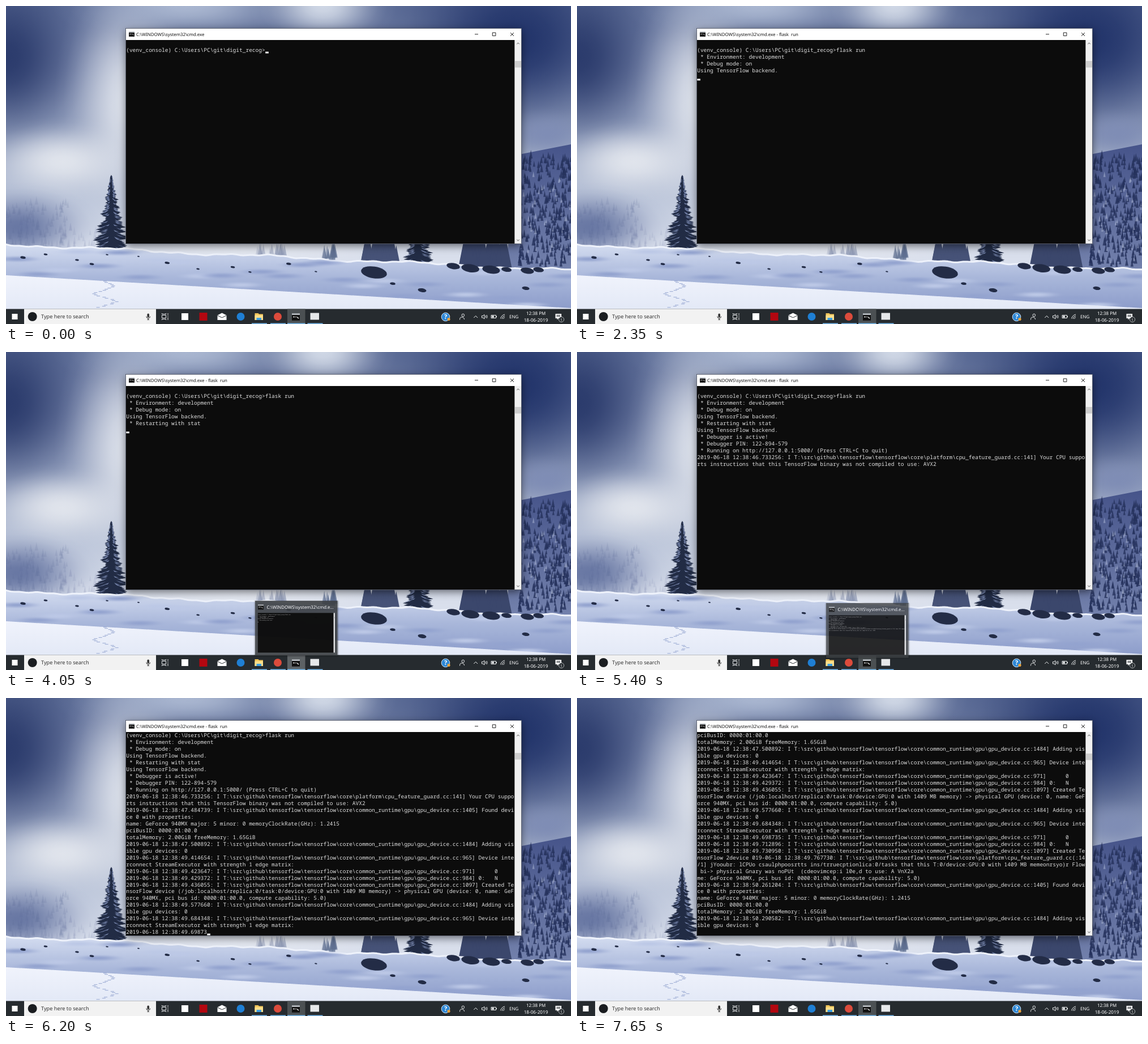
Recreate the animation shown at these times as an HTML page with a canvas. Size 998x561 px, loop 8 s.

```html
<!DOCTYPE html>
<html lang="en">
<head>
<meta charset="utf-8">
<title>Console session</title>
<style>
  html, body { margin: 0; width: 100%; height: 100%; overflow: hidden; background: #262b2f; }
  canvas, svg { position: absolute; left: 0; top: 0; width: 998px; height: 561px; display: block; }
  text { white-space: pre; text-rendering: geometricPrecision; font-family: "Noto Sans", "Open Sans", sans-serif; }
  .mono text { font: 9.533px "Noto Sans Mono", "DejaVu Sans Mono", monospace; fill: #dedede; }
  .line { fill: none; stroke-width: 1; }
</style>
</head>
<body>
<canvas id="wall" width="998" height="561"></canvas>
<svg viewBox="0 0 998 561" xmlns="http://www.w3.org/2000/svg">
  <!-- window -->
  <rect x="211.5" y="39.5" width="699" height="380" fill="#fff" stroke="#4a5060" stroke-width=".8"/>
  <g id="cmdIcon">
    <rect x="217" y="45" width="10" height="9" fill="#111"/>
    <rect x="217" y="45" width="10" height="2" fill="#b9bdc2"/>
    <path class="line" d="M218.5 49.5h2m1 0h1m1 0l2 2" stroke="#eee"/>
  </g>
  <text id="title" x="230" y="52.8" font-size="7.82" fill="#111"></text>
  <path class="line" d="M828 49.8h6M859.3 47h5.6v5.6h-5.6zM891 47l6 6m0-6l-6 6" stroke="#222"/>
  <g id="screen">
    <rect x="212" y="60" width="686.6" height="359" fill="#0c0c0c"/>
    <rect x="898.6" y="60" width="11.4" height="359" fill="#f0f0f0"/>
    <rect id="thumb" x="899" width="11" height="11.5" fill="#cdcdcd"/>
    <path class="line" d="M902.3 67.2l2.2-2.2 2.2 2.2M902.3 412l2.2 2.2 2.2-2.2" stroke="#444"/>
    <g id="rows" class="mono"></g>
    <rect id="cursor" width="5.7" height="3" fill="#f2f2f2"/>
  </g>

  <!-- taskbar, left part -->
  <rect y="534.5" width="998" height="27" fill="#262b2f"/>
  <rect x="32" y="534.5" width="233" height="27" fill="#f2f2f2"/>
  <rect x="10.5" y="543" width="10" height="10" fill="#fff"/>
  <circle cx="46.7" cy="548" r="8" fill="#1a1d20"/>
  <text x="62" y="551.4" font-size="9.2" fill="#333">Type here to search</text>
  <rect x="249.4" y="542.5" width="3.6" height="7" rx="1.8" fill="#333"/>
  <path class="line" d="M247.8 547.5a3.4 3.4 0 0 0 6.8 0M251.2 551v2.4m-1.8 0h3.6" stroke="#333"/>
  <path class="line" d="M275.5 545.5h7v5h-7zM275.5 542v1.5h7V542M275.5 554v-1.5h7v1.5M286 542v3m0 4v5m-1-7h2" stroke="#e4e6e8"/>
  <rect x="310" y="542" width="12" height="12" fill="#fff"/>
  <rect x="341.5" y="541" width="14" height="14" fill="#b20710"/>
  <path d="M373.5 545.5l8-4 8 4v8.5h-16z" fill="#fff"/>
  <path class="line" d="M373.5 545.8l8 4 8-4" stroke="#262b2f"/>
  <circle cx="414.5" cy="548" r="7" fill="#1f7fd4"/>
  <path d="M439.5 542h6l1.5 1.5h7V554h-14.5z" fill="#f2c65a"/>
  <rect x="439.5" y="545.5" width="14.5" height="8.5" fill="#ffe08c"/>
  <rect x="442.5" y="550" width="8.5" height="4" fill="#3f9fe0"/>
  <circle cx="480" cy="548" r="7" fill="#dc4b3c"/>
  <rect x="497" y="534.5" width="31.5" height="27" fill="#4b5053"/>
  <rect id="hover" x="497" y="534.5" width="31.5" height="27" fill="#fff"/>
  <use href="#cmdIcon" transform="translate(201.2 479.2) scale(1.4)"/>
  <rect x="537.5" y="541.5" width="15.5" height="12" fill="#e6e8ea"/>
  <path d="M434 560.2h27m6 0h27m3 0h31.5m4 0h27" stroke="#76b9ed" stroke-width="1.6"/>

  <!-- taskbar, right part -->
  <circle cx="776.5" cy="548.5" r="7.3" fill="#2d87d6" stroke="#dceaf6"/>
  <text x="776.5" y="552.4" font-size="11" font-weight="700" fill="#fff" text-anchor="middle">?</text>
  <circle cx="782" cy="552.5" r="2.6" fill="#e9a13b"/>
  <g class="line" stroke="#eceeef">
    <circle cx="807.3" cy="545.5" r="2.3"/>
    <path d="M801.5 553.5c0-3 1-4.500 3-4.500m0 0c3 0 5 1 5 4M826.300 550l3.400-3.400 3.400 3.400"/>
    <path d="M840.500 546.500h2l2.500-2v7.500l-2.500-2h-2zM847 546q1 2 0 4M849 545q2 3 0 6"/>
    <path d="M857 545.500h8.500v5H857zM866.500 547v2"/>
    <path d="M873.500 551.500q1.500-6 7.500-7.500M876 552q1-4.500 5-5.500M878.500 552q.5-2 2.500-3"/>
  </g>
  <rect x="858" y="546.5" width="4" height="3" fill="#eceeef"/>
  <g fill="#fff">
    <text x="889" y="551" font-size="7.9">ENG</text>
    <text x="936" y="544.8" font-size="7.9" text-anchor="middle">12:38 PM</text>
    <text x="936" y="557" font-size="8.2" text-anchor="middle">18-06-2019</text>
    <path d="M970.5 543H981v8h-5l-2.500 2.500V551h-3z"/>
  </g>
  <path class="line" d="M972.5 545.5h6.500m-6.500 2h6.500" stroke="#262b2f"/>
  <circle cx="981" cy="553" r="4.6" fill="#262b2f" stroke="#cfd2d4" stroke-width=".8"/>
  <text x="981" y="555.5" font-size="6.6" fill="#fff" text-anchor="middle">1</text>

  <!-- taskbar preview -->
  <g id="preview">
    <rect x="438" y="437" width="150" height="100" rx="3" opacity=".14"/>
    <rect x="440" y="438" width="145.6" height="96.5" fill="#3d4144" opacity=".9"/>
    <use href="#cmdIcon" transform="translate(228 399.5)"/>
    <text x="460.5" y="451.8" font-size="7.8" fill="#fff">C:\WINDOWS\system32\cmd.e...</text>
    <use href="#screen" transform="translate(444.8 459.3) scale(.195) translate(-212 -60)"/>
  </g>
</svg>

<script>
const $ = id => document.getElementById(id);
const clamp = v => Math.min(1, Math.max(0, v));

// ---------- wallpaper ----------
const W = 998, H = 561;
const ctx = $('wall').getContext('2d');
let seed = 7;
const rnd = (a = 0, b = 1) => a + (b - a) * (seed = seed * 16807 % 2147483647) / 2147483647;
const crest = x => 419 + .046 * x + 2 * Math.sin(x / 42) + Math.sin(x / 13) + .6 * Math.sin(x / 5);
const shore = x => 475 + .058 * x;

function fade(y0, y1, ...colors) {
  const g = ctx.createLinearGradient(0, y0, 0, y1);
  colors.forEach((c, i) => g.addColorStop(i / (colors.length - 1), c));
  return g;
}
function glow(x, y, rx, ry, color) {
  ctx.save();
  ctx.translate(x, y);
  ctx.scale(rx, ry);
  const g = ctx.createRadialGradient(0, 0, 0, 0, 0, 1);
  for (let k = 0; k <= 1; k += .125) {
    const alpha = Math.round(255 * Math.cos(k * Math.PI / 2) ** 2);
    g.addColorStop(k, color + alpha.toString(16).padStart(2, '0'));
  }
  ctx.fillStyle = g;
  ctx.fillRect(-1, -1, 2, 2);
  ctx.restore();
}
function shape(points, fill) {
  ctx.beginPath();
  points.forEach(p => ctx.lineTo(...p));
  ctx.fillStyle = fill;
  ctx.fill();
}
function ground(edge, fill) {
  const points = [];
  for (let x = 0; x <= W; x += 2) points.push([x, edge(x)]);
  shape([...points, [W, H], [0, H]], fill);
}
function forest(x0, x1, y0, y1, height, count, fill) {
  for (let i = 0; i < count; i++) {
    const x = rnd(x0, x1), y = rnd(y0, y1), h = height * rnd(.6, 1.1);
    shape([[x - h * .2, y], [x, y - h], [x + h * .2, y]], fill);
  }
}
function conifer(x, top, base, half) {
  for (let y = top; y < base; y += 2) {
    for (const side of [-1, 1]) {
      const w = side * (2 + half * (y - top) / (base - top) * rnd(.3, 1)), tip = y + Math.abs(w) * .2;
      shape([[x, y - 3], [x + w, tip], [x + w * .5, tip + 2], [x, y + 2]], '#222c45');
      if (rnd() < .6) shape([[x + w * .3, y - 2], [x + w, tip - 1], [x + w * .5, y + 1]], '#7786ad');
    }
  }
}
function rock(x, y, r) {
  ctx.beginPath();
  ctx.ellipse(x, y, r, r * .45, .15, 0, 7);
  ctx.fillStyle = '#232c46';
  ctx.fill();
}

function paintWall() {
  ctx.fillStyle = fade(0, 440, '#5d6d97', '#7482a8', '#8f9cbb', '#b9c3d8', '#d9dfec');
  ctx.fillRect(0, 0, W, H);
  glow(0, 90, 170, 190, '#2b3b6c');
  glow(215, 170, 130, 260, '#dbe0ea');
  glow(100, 275, 160, 80, '#e0e4ec');
  glow(20, 390, 150, 80, '#6877a3');
  glow(320, 0, 240, 70, '#a9b6d0');
  glow(560, 0, 130, 80, '#cfd7e5');
  glow(900, 60, 260, 210, '#22346a');
  glow(955, 225, 90, 50, '#7f8db5');
  glow(430, 425, 330, 45, '#e4e8f1');
  forest(0, 110, 350, 430, 14, 110, '#5c6a9922');
  forest(90, 212, 395, 435, 16, 60, '#6c7aa51c');

  const ridge = fade(245, 470, '#46548a', '#7482ad');
  shape([[880, 480], [906, 262], [W, 244], [W, 480]], ridge);
  forest(906, W, 268, 462, 14, 330, '#26325ccc');
  forest(906, W, 300, 460, 10, 45, '#aab6d488');
  forest(444, 494, 440, 446, 24, 26, '#8794b244');
  forest(560, 582, 442, 448, 26, 16, '#60709288');
  forest(632, 690, 446, 460, 44, 60, '#465277');
  forest(806, 884, 460, 470, 56, 70, '#3b476c');
  conifer(186, 301, 431, 38);
  conifer(727, 360, 459, 38);

  ground(crest, '#eef2fb');
  ground(x => crest(x) + 3, fade(422, 535, '#d3dcf0', '#a9b7da', '#8c9cca'));
  for (let x = 20; x < W; x += 36) glow(x, rnd(crest(x) + 8, shore(x)), 50, 7, rnd() < .5 ? '#bcc8e6' : '#93a3cf');
  ground(shore, fade(474, 540, '#f0f3fc', '#e2e8f6'));

  for (let x = 30; x < 560; x += rnd(25, 70)) rock(x, crest(x) + rnd(12, 34), rnd(2, 5));
  for (let x = 790; x < 960; x += rnd(18, 38)) rock(x, crest(x) + 4, rnd(9, 16));
  for (const x of [683, 735, 918]) rock(x, rnd(482, 510), rnd(4, 9));
  rock(650, 470, 23);
  for (let y = 483; y < 533; y += 2) {
    ctx.fillStyle = '#a5b3d8';
    ctx.fillRect(168 + 17 * Math.sin(y * .22) + rnd(0, 8), y, 6, 1.2);
  }
  ctx.shadowColor = '#0008';
  ctx.shadowBlur = 14;
  ctx.shadowOffsetY = 4;
  ctx.fillStyle = '#222';
  ctx.fillRect(212, 40, 698, 379);
}

// ---------- console output ----------
const raw = String.raw;
const prompt = raw`(venv_console) C:\Users\PC\git\digit_recog>`;
const run = prompt + 'flask run';
const core = raw`T:\src\github\tensorflow\tensorflow\core`;
const guard = core + raw`\platform\cpu_feature_guard.cc`;
const backend = 'Using TensorFlow backend.';
const gpu = (sec, tail) => `2019-06-18 12:38:${sec}: I ${core}` + raw`\common_runtime\gpu\gpu_device.cc:` + tail;
const found = sec => [gpu(sec, '1405] Found devi'), 'ce 0 with properties:',
  'name: GeForce 940MX major: 5 minor: 0 memoryClockRate(GHz): 1.2415', 'pciBusID: 0000:01:00.0'];
const memory = 'totalMemory: 2.00GiB freeMemory: 1.65GiB';
const adding = sec => [gpu(sec, '1484] Adding vis'), 'ible gpu devices: 0'];
const matrix = sec => [gpu(sec, '965] Device inte'), 'rconnect StreamExecutor with strength 1 edge matrix:'];
const edges = (a, b) => [gpu(a, '971]      0'), gpu(b, '984] 0:   N')];
const created = sec => gpu(sec, '1097] Created Te');

// A burst starts at a time, prints a line every few ms and leaves an unfinished tail.
const bursts = [
  { at: 0, lines: [''], tail: prompt },
  { at: 1000, tail: run },
  { at: 1150, tail: prompt + 'set FLASK_ENV=development' },
  { at: 1500, tail: run },
  { at: 1600, lines: [run] },
  { at: 1800, lines: [' * Environment: development', ' * Debug mode: on'] },
  { at: 2350, lines: [backend] },
  { at: 3050, lines: [' * Restarting with stat'] },
  { at: 4200, lines: [backend] },
  { at: 4400, every: 25, lines: [' * Debugger is active!', ' * Debugger PIN: 122-894-579',
    ' * Running on http://127.0.0.1:5000/ (Press CTRL+C to quit)'] },
  { at: 4900, every: 100, lines: [`2019-06-18 12:38:46.733256: I ${guard}:141] Your CPU suppo`,
    'rts instructions that this TensorFlow binary was not compiled to use: AVX2'] },
  { at: 5450, every: 16, lines: [...found('47.484739'), memory, ...adding('47.500892')] },
  { at: 5950, every: 24, lines: [...matrix('49.414654'), ...edges('49.423647', '49.429372'), created('49.436055'),
    'nsorFlow device (/job:localhost/replica:0/task:0/device:GPU:0 with 1409 MB memory) -> physical GPU (device: 0, name: GeF',
    'orce 940MX, pci bus id: 0000:01:00.0, compute capability: 5.0)',
    ...adding('49.577660'), ...matrix('49.684348')], tail: '2019-06-18 12:38:49.69873' },
  { at: 6250, every: 8, lines: [...edges('49.698735', '49.712896'), created('49.730950'),
    `nsorFlow 2device 019-06-18 12:38:49.767730: I ${guard}(:14`,
    '/1] jYooubr: lCPUo csaulphpoosrtts ins/trruecptionlica:0/tasks that this T:0/device:GPU:0 with 1409 MB memeonrsyo)r Flow',
    ' bi-> physical Gnary was noPUt  (cdeovimcep:i l0e,d to use: A VnX2a',
    'me: GeForce 940MX, pci bus id: 0000:01:00.0, compute capability: 5.0)'] },
  { at: 6700, lines: found('50.261204'), tail: 't' },
  { at: 6750, lines: [memory, ...adding('50.290582')] },
];
const cursorFlips = [300, 800, 1300, 1500, 3200, 3700, 4200, 5550, 5700, 5950, 7650];

const LOOP = 8000, TICK = 50, ROWS = 30, LEFT = 212.2, TOP = 60, PITCH = 11.965, CHAR = 5.72;
const rows = Array.from({ length: ROWS }, (_, i) => {
  const row = document.createElementNS('http://www.w3.org/2000/svg', 'text');
  row.setAttribute('x', LEFT);
  row.setAttribute('y', TOP + PITCH * i + 9.3);
  return $('rows').appendChild(row);
});

function printed(t) {
  const out = [];
  let tail = '';
  for (const { at, every = 0, lines = [], tail: rest = '' } of bursts) {
    if (at > t) break;
    const ready = lines.filter((_, i) => at + i * every <= t);
    out.push(...ready);
    tail = ready.length === lines.length ? rest : '';
  }
  return [...out, tail];
}

function drawConsole(t) {
  const text = printed(t);
  const view = text.slice(-ROWS);
  rows.forEach((row, i) => row.textContent = view[i] ?? '');
  $('cursor').setAttribute('x', LEFT + CHAR * view.at(-1).length);
  $('cursor').setAttribute('y', TOP + PITCH * (view.length - 1) + 8.6);
  $('cursor').setAttribute('opacity', 1 - cursorFlips.filter(f => f <= t).length % 2);
  $('thumb').setAttribute('y', 97 + Math.floor(text.length / 42));
  $('title').textContent = raw`C:\WINDOWS\system32\cmd.exe` + (t < 1650 ? '' : ' - flask  run');
}

function drawPreview(t) {
  const enter = clamp((t - 3900) / 200), leave = clamp((t - 5300) / 200);
  const shift = 16 * (1 - enter) ** 2 + 20 * leave ** 2;
  $('preview').setAttribute('transform', `translate(0 ${shift})`);
  $('preview').setAttribute('opacity', clamp(enter * 1.3) * (1 - leave ** 3));
  $('hover').setAttribute('opacity', t < 3300 ? 0 : .1 * clamp((5200 - t) / 400));
}

let shown = -1;
function frame(now) {
  const t = Math.floor(now % LOOP / TICK) * TICK;
  if (t !== shown) {
    shown = t;
    drawConsole(t);
    drawPreview(t);
  }
  requestAnimationFrame(frame);
}
paintWall();
frame(0);
</script>
</body>
</html>
```
